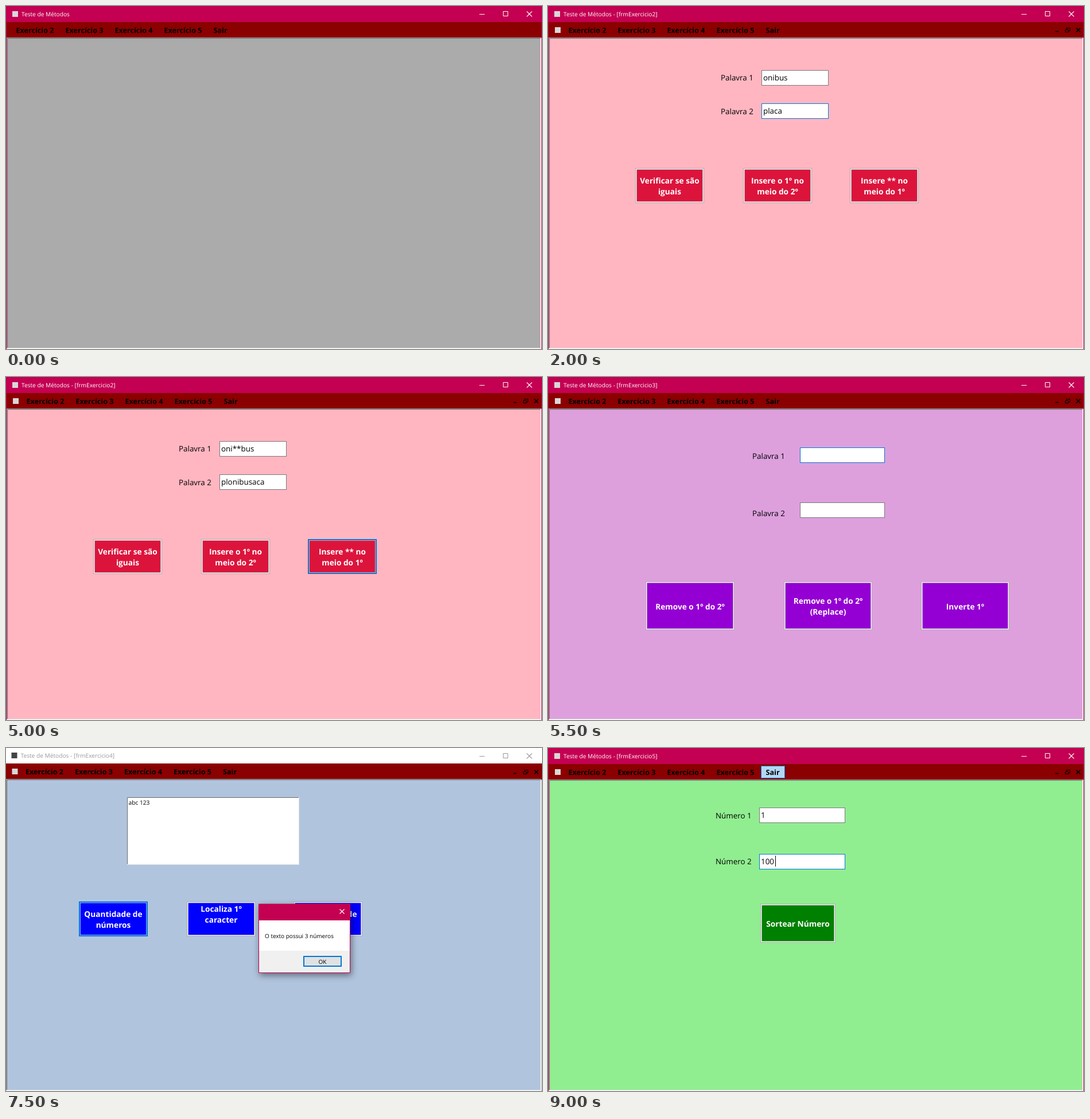
Animation, 934 px wide and 599 px high, one loop 9.5 s. Source, as an HTML page:

```html
<!DOCTYPE html>
<html lang="pt">
<head>
<meta charset="utf-8">
<title>Teste de Métodos</title>
<style>
html, body { margin: 0; width: 100%; height: 100%; overflow: hidden; }
svg { display: block; width: 934px; height: 599px; }
text { font-family: "Open Sans", "Noto Sans", sans-serif; white-space: pre; text-rendering: geometricPrecision; }
</style>
</head>
<body>
<svg id="stage" viewBox="0 0 934 599"></svg>
<script>
const PINK = '#c40052', BLUE = '#0078d7';
const MENU = ['Exercício 2', 'Exercício 3', 'Exercício 4', 'Exercício 5', 'Sair'];

// labels: [text, x, baseline]; inputs and buttons: [x, y, width, height, ...]
const FORMS = {
  2: {
    bg: '#ffb6c1', fill: '#dc143c',
    labels: [['Palavra 1', 301, 130], ['Palavra 2', 301, 189]],
    inputs: [[372, 112, 117, 27], [372, 170, 117, 27]],
    buttons: [[152, 283, 120, 61, ['Verificar se são', 'iguais']],
              [340, 283, 120, 61, ['Insere o 1º no', 'meio do 2º']],
              [526, 283, 120, 61, ['Insere ** no', 'meio do 1º']]]
  },
  3: {
    bg: '#dda0dd', fill: '#9400d3',
    labels: [['Palavra 1', 356, 143], ['Palavra 2', 356, 243]],
    inputs: [[439, 123, 148, 27], [439, 219, 148, 27]],
    buttons: [[170, 357, 155, 85, ['Remove o 1º do 2º']],
              [411, 357, 154, 85, ['Remove o 1º do 2º', '(Replace)']],
              [650, 357, 154, 85, ['Inverte 1º']]]
  },
  4: {
    bg: '#b0c4de', fill: '#0000ff',
    labels: [],
    inputs: [[212, 87, 300, 118]],
    buttons: [[128, 269, 120, 61, ['Quantidade de', 'números']],
              [316, 269, 120, 61, ['Localiza 1º', 'caracter', '']],
              [502, 269, 120, 61, ['Quantidade de', 'letras']]]
  },
  5: {
    bg: '#90ee90', fill: '#008000',
    labels: [['Número 1', 292, 123], ['Número 2', 292, 203]],
    inputs: [[368, 104, 150, 27], [368, 185, 150, 27]],
    buttons: [[370, 272, 131, 68, ['Sortear Número']]]
  }
};

// One entry per half second. edit: focused input, hot: hovered button, on: focused button
const STEPS = [
  {},
  { menu: 0 },
  { form: 2, values: ['', ''], edit: 0 },
  { form: 2, values: ['onibus', ''], edit: 0 },
  { form: 2, values: ['onibus', 'placa'], edit: 1 },
  { form: 2, values: ['onibus', 'placa'], hot: 0 },
  { form: 2, values: ['onibus', 'placa'], on: 0, message: 'Palavras diferentes' },
  { form: 2, values: ['onibus', 'placa'], hot: 1 },
  { form: 2, values: ['onibus', 'plonibusaca'], on: 1 },
  { form: 2, values: ['onibus', 'plonibusaca'], hot: 2 },
  { form: 2, values: ['oni**bus', 'plonibusaca'], on: 2 },
  { form: 3, values: ['', ''], edit: 0 },
  { form: 3, values: ['azul', 'azul marinho'], hot: 0 },
  { form: 3, values: ['azul', ' marinho'], hot: 0 },
  { form: 4, values: ['abc 123'], edit: 0 },
  { form: 4, values: ['abc 123'], on: 0, message: 'O texto possui 3 números' },
  { form: 4, values: ['abc 123'], hot: 1 },
  { form: 4, values: ['abc 123'], on: 1, message: 'Espaço na posição 4' },
  { form: 5, values: ['1', '100'], edit: 1, menu: 4, caret: 396 }
];

const rect = (x, y, w, h, fill, more = '') =>
  `<rect x="${x}" y="${y}" width="${w}" height="${h}" fill="${fill}" ${more}/>`;
const frame = (x, y, w, h, color, fill = 'none') =>
  rect(x + .5, y + .5, w - 1, h - 1, fill, `stroke="${color}"`);
const line = (d, color, width = 1) =>
  `<path d="${d}" fill="none" stroke="${color}" stroke-width="${width}"/>`;
const text = (s, x, y, size, color = '#000', more = '') =>
  `<text x="${x}" y="${y}" font-size="${size}" fill="${color}" ${more}>${s}</text>`;
const shift = (x, y, body) => `<g transform="translate(${x} ${y})">${body}</g>`;
const cross = (x, y, s, color, width) =>
  line(`M${x} ${y}l${s} ${s}m0 ${-s}l${-s} ${s}`, color, width);

function titleBar(form, active) {
  const color = active ? '#fff' : '#999';
  const title = 'Teste de Métodos' + (form ? ` - [frmExercicio${form}]` : '');
  const body = rect(11, 9, 10, 10, active ? '#d8d8d8' : '#444') +
    text(title, 27, 18, 10.2, color);
  return rect(0, 0, 934, 28, active ? PINK : '#fff') +
    shift(active ? 0 : -1.5, active ? 0 : -1, body) +
    line('M825 14.5h9M866.5 9.5h8v8h-8z', color) + cross(907.5, 9.5, 9, color, 1.1);
}

function menuBar(form, hover, active) {
  let body = form ? rect(12, 37, 10, 10, '#d8d8d8') : '';
  MENU.forEach((name, i) => {
    const x = (form ? 36 : 18) + i * 86;
    if (i === hover) body += frame(x - 10 + (i === 4), 31, i === 4 ? 42 : 87, 22, BLUE, '#b3d7f3');
    body += text(name, x - .5, 47, 12.6, '#000', 'font-weight="700"');
  });
  const edge = active ? 1 : 0;
  return rect(edge, 28 - !active, 934 - 2 * edge, 28, '#8b0000') +
    shift(active ? 0 : -1.5, active ? 0 : -1, body) +
    (form ? line('M884 44.5h6', '#000', 1.5) + line('M903.5 41v-2.5h6v5h-2.5M901.5 41.5h5.5v4h-5.5z', '#000') +
      cross(920.5, 38.5, 7, '#000', 1.7) : '');
}

function button([x, y, w, h, lines], fill, hot, on) {
  const top = y + h / 2 + 6 - (lines.length - 1) * 9.5;
  return rect(x, y, w, h, hot || on ? BLUE : '#adadad') +
    rect(x + 1, y + 1, w - 2, h - 2, on ? BLUE : '#eee') +
    rect(x + 2, y + 2, w - 4, h - 4, '#e1e1e1') +
    rect(x + 2.7, y + 2.7, w - 5.4, h - 5.4, fill) +
    lines.map((s, i) => text(s, x + w / 2, top + i * 19, 13.7, '#fff',
      'font-weight="700" text-anchor="middle"')).join('');
}

function input([x, y, w, h], value, focus) {
  if (h > 40) {
    return rect(x, y, w, h, '#fff') +
      line(`M${x + .5} ${y + h - 1}V${y + .5}H${x + w - 1}`, '#696969') +
      line(`M${x + 1} ${y + h - .5}H${x + w - .5}V${y + 1}`, '#e3e3e3') +
      text(value, x + 2.5, y + 13, 10.2);
  }
  return frame(x, y, w, h, focus ? BLUE : '#7a7a7a', '#fff') + text(value, x + 3, y + 18, 13.4);
}

function formBody(step) {
  const f = FORMS[step.form];
  return f.labels.map(([s, x, y]) => text(s, x, y, 13.4)).join('') +
    f.inputs.map((box, i) => input(box, step.values[i], step.edit === i)).join('') +
    f.buttons.map((box, i) => button(box, f.fill, step.hot === i, step.on === i)).join('') +
    (step.caret ? line(`M${step.caret + .5} 188v19`, '#000') : '');
}

function messageBox(message) {
  return rect(440, 272, 160, 121, PINK, 'style="filter:drop-shadow(2px 4px 6px #0007)"') +
    rect(441, 301, 158, 53, '#fff') + rect(441, 354, 158, 38, '#f0f0f0') +
    cross(581.5, 281.5, 8, '#fff', 1.1) +
    text(message, 451, 331.5, 10) +
    rect(518, 363, 67, 19, BLUE) + rect(520, 365, 63, 15, '#e1e1e1') +
    text('OK', 551.5, 376.5, 10, '#000', 'text-anchor="middle"');
}

function scene(step) {
  const active = !step.message, d = active ? 1 : 0;
  const bg = step.form ? FORMS[step.form].bg : '#ababab';
  return rect(0, 0, 934, 599, active ? PINK : '#aaa') +
    titleBar(step.form, active) + menuBar(step.form, step.menu, active) +
    rect(d, 54 + d, 932, 544, bg) +
    line(`M${d + .5} 598V${54.5 + d}H932`, '#a0a0a0') +
    line(`M${d + 1.5} 597V${55.5 + d}H931`, '#696969') +
    line(`M${d} 598.5H932.5V56`, '#fff') + line(`M${d + 1} 597.5H931.5V57`, '#e3e3e3') +
    (step.form ? shift(d - 1, d - 1, formBody(step)) : '') +
    (step.message ? messageBox(step.message) : '');
}

const stage = document.getElementById('stage');
const start = performance.now();
let shown = -1;
function draw() {
  const now = Math.floor((performance.now() - start) / 500) % STEPS.length;
  if (now !== shown) stage.innerHTML = scene(STEPS[shown = now]);
  requestAnimationFrame(draw);
}
draw();
</script>
</body>
</html>
```
